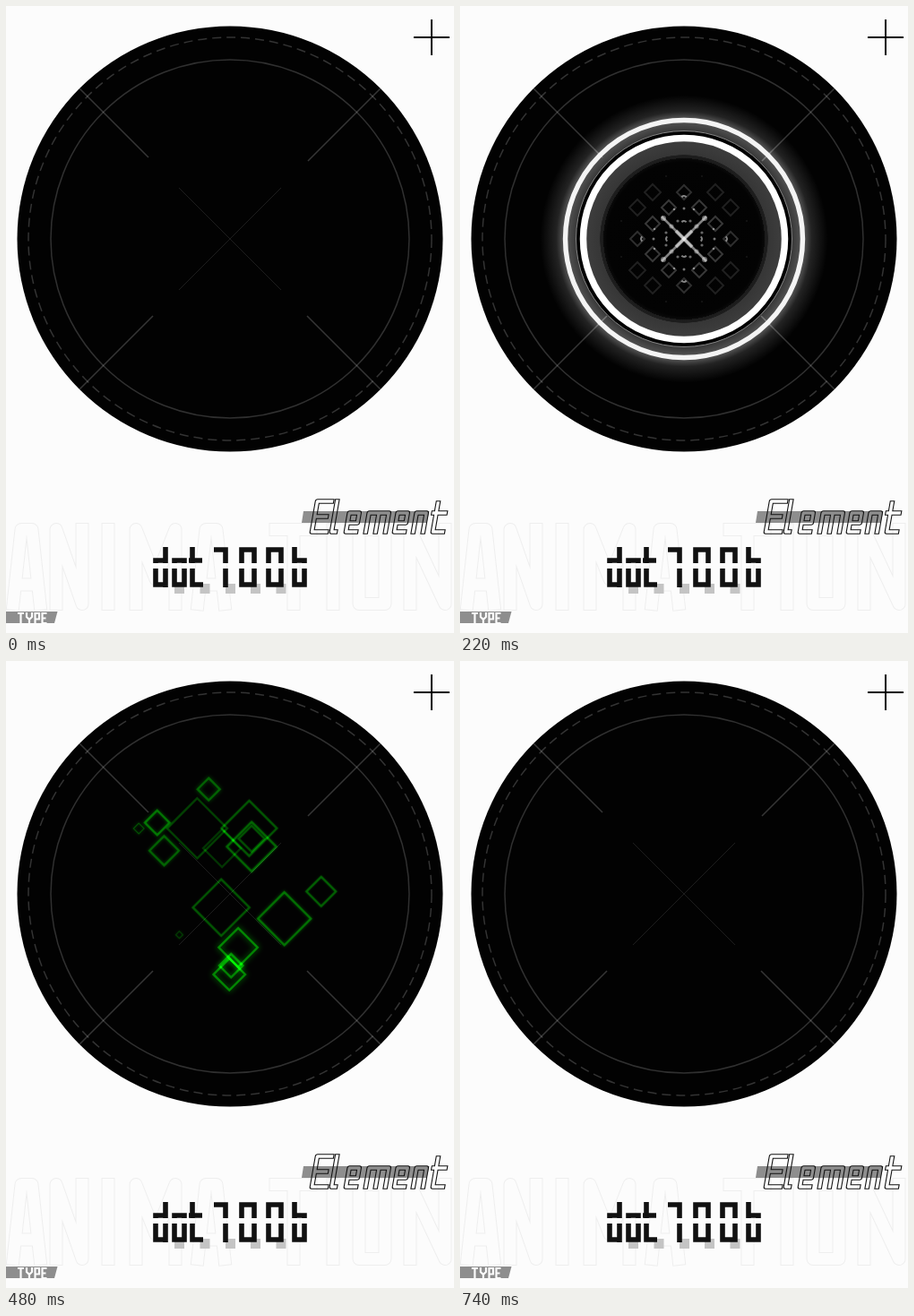
An HTML page with a canvas for the animation above (1 s loop, 500 by 700 pixels).

```html
<!DOCTYPE html>
<html lang="en">
<head>
<meta charset="utf-8">
<title>Element animation</title>
<style>
html, body { margin: 0; width: 100%; height: 100%; overflow: hidden; background: #fcfcfc; }
svg, canvas { position: absolute; left: 0; top: 0; width: 500px; height: 700px; display: block; }
path, use { fill: none; }
.line { stroke-linecap: square; stroke-linejoin: round; }
</style>
</head>
<body>
<svg viewBox="0 0 500 700" role="img" aria-label="ANIMATION, Element, dot700b, TYPE">
  <defs>
    <g id="big" class="line">
      <path d="M8 667.5L17 584.5H29L38 667.5M13 646H33"/>
      <path d="M56 667.5V584.5L85 667.5V584.5"/>
      <path d="M114 584.5V667.5"/>
      <path d="M145 667.5V584.5L167 640L189 584.5V667.5"/>
      <path d="M214 667.5L223 584.5H235L244 667.5M219 646H239"/>
      <path d="M301 584.5H340M321 584.5V667.5"/>
      <path d="M365 584.5V667.5"/>
      <path d="M394 584.5H423V667.5H394Z"/>
      <path d="M451 667.5V584.5L490 667.5V584.5"/>
    </g>
    <g id="word" class="line" transform="translate(104 0) skewX(-10)">
      <path d="M357 587H341V553H357M341 570H354"/>
      <path d="M363 553V587H367"/>
      <path d="M390 587H379V566H390V577H381"/>
      <path d="M401 587V566H423V587M412 568V587"/>
      <path d="M444 587H433V566H444V577H435"/>
      <path d="M454 587V566H465V587"/>
      <path d="M476 555V587H487M473 566H486"/>
    </g>
    <mask id="bigCut" maskUnits="userSpaceOnUse" x="0" y="0" width="500" height="700">
      <rect width="500" height="700" fill="#fff"/>
      <use href="#big" stroke="#000" stroke-width="13"/>
    </mask>
    <mask id="wordCut" maskUnits="userSpaceOnUse" x="0" y="0" width="500" height="700">
      <rect width="500" height="700" fill="#fff"/>
      <use href="#word" stroke="#000" stroke-width="3.4"/>
    </mask>
    <clipPath id="split"><path d="M150 604H350V622H150ZM150 628H350V649H150Z"/></clipPath>
  </defs>

  <path d="M475 15V55M455 35H495" stroke="#000" stroke-width="2"/>
  <g mask="url(#bigCut)"><use href="#big" stroke="#eee" stroke-width="15"/></g>

  <path d="M332 564H472.500L469.500 577H330Z" style="fill:#8e8e8e"/>
  <g mask="url(#wordCut)"><use href="#word" stroke="#111" stroke-width="5.6"/></g>

  <path d="M193.500 645v11M222 645v11M250.500 645v11M278.500 645v11M307 645v11" stroke="#c4c4c4" stroke-width="11"/>
  <g clip-path="url(#split)" stroke="#111" stroke-width="5.6">
    <path d="M178 604V649M178 619H167V646H178"/>
    <path d="M188 619H199V646H188Z"/>
    <path d="M208 604V646H220M204 619H219"/>
    <path d="M232 607H245V649"/>
    <path d="M263 607H277V646H263Z"/>
    <path d="M293 607H307V646H293Z"/>
    <path d="M322 604V646H333V619H322"/>
  </g>

  <path d="M0 676H57.500L54 689H0Z" style="fill:#8e8e8e"/>
  <path stroke="#fcfcfc" stroke-width="2.2"
    d="M13 678H20M16.500 678V690M23 677V682L26 685L29 682V677M26 685V690M32.500 690V678H37V684.500H32.500M45.500 678H40.500V689H45.500M40.500 683.500H44.500"/>
</svg>
<canvas id="stage" width="500" height="700"></canvas>

<script>
const ctx = document.getElementById('stage').getContext('2d');
const CX = 250, CY = 260, TAU = Math.PI * 2;
const clamp = (v, lo = 0, hi = 1) => Math.min(hi, Math.max(lo, v));
const grey = (v, a = 1) => `rgba(${v},${v},${v},${a})`;

// first wave: x, y at 400 ms, x, y at 540 ms, half size, brightness
const early = [
  [235, 198, 223, 123, 9.5, .65],
  [197, 222, 169, 208, 12.500, .6],
  [176, 220, 138, 175, 4.5, .6],
  [320, 163, 338, 140, 0, .6],
  [254, 303, 261, 326, 16.500, 1],
  [249, 305, 252, 353, 10, .9],
  [250, 336, 249, 355, 13.500, 1],
  [222, 291, 183, 311, 3, .4]
];
// second wave: x, y at 540 ms, half size, brightness
const late = [
  [159, 171, 10.500, .9], [209, 178, 25.500, .55], [240, 203, 16, .5],
  [274, 178, 23.500, .65], [277, 201, 21, .75], [277, 191, 11, .6],
  [268, 238, 17, .35], [266, 259, 30, .3], [272, 245, 9, .35],
  [239, 277, 24, .65], [252, 257, 24, .2], [262, 283, 7, .4],
  [318, 291, 22.500, .85], [364, 257, 12.500, .7]
];
const sparks = [
  ...early.map(([x0, y0, x, y, size, glow]) => ({ x0, y0, x, y, size, glow, start: 350 })),
  ...late.map(([x, y, size, glow]) => ({
    x0: CX + (x - CX) * .6, y0: CY + (y - CY) * .6,
    x, y, size, glow, start: 420 + (1 - glow) * 100
  }))
];

function circle(r, width, color) {
  ctx.beginPath();
  ctx.arc(0, 0, r, 0, TAU);
  ctx.lineWidth = width;
  ctx.strokeStyle = color;
  ctx.stroke();
}

function disc(r, fill, x = 0, y = 0) {
  ctx.beginPath();
  ctx.arc(x, y, r, 0, TAU);
  ctx.fillStyle = fill;
  ctx.fill();
}

function line(x0, y0, x1, y1) {
  ctx.beginPath();
  ctx.moveTo(x0, y0);
  ctx.lineTo(x1, y1);
  ctx.stroke();
}

function diamond(x, y, s) {
  ctx.beginPath();
  ctx.moveTo(x, y - s);
  ctx.lineTo(x + s, y);
  ctx.lineTo(x, y + s);
  ctx.lineTo(x - s, y);
  ctx.closePath();
  ctx.stroke();
}

function radial(outer, stops) {
  const g = ctx.createRadialGradient(0, 0, 0, 0, 0, outer);
  for (const [r, color] of stops) g.addColorStop(clamp(r / outer), color);
  return g;
}

function drawBase() {
  disc(237.5, '#020202');
  circle(200, 1.5, '#303030');
  ctx.setLineDash([10, 6]);
  circle(225, 1.5, '#333');
  ctx.setLineDash([]);
  ctx.strokeStyle = grey(255, .2);
  ctx.lineWidth = 1.6;
  line(-168, -168, -91, -91);
  line(168, -168, 87, -87);
  line(-168, 168, -86, 86);
  line(168, 168, 86, 86);
  ctx.strokeStyle = grey(255, .11);
  ctx.lineWidth = 1;
  line(-57, -57, 57, 57);
  line(57, -57, -57, 57);
}

function drawApproach(t) {
  const alpha = clamp(t / 182) * clamp((285 - t) / 45);
  if (!alpha) return;
  const r = Math.max(207.7 - .342 * t, 120);
  ctx.save();
  ctx.globalCompositeOperation = 'lighter';
  ctx.globalAlpha = alpha;
  disc(r + 28, radial(r + 28, [
    [0, grey(255, .05)], [r - 40, grey(255, .06)], [r - 20, grey(255, .13)],
    [r - 3, grey(255, .3)], [r + 3, grey(255, .3)], [r + 10, grey(255, .13)],
    [r + 28, grey(255, 0)]
  ]));
  ctx.globalCompositeOperation = 'source-over';
  circle(r, r * .041, '#f4f4f4');
  ctx.restore();
}

function drawPattern() {
  for (let k = 0; k < 4; k++) {
    ctx.save();
    ctx.rotate(k * TAU / 4);
    ctx.strokeStyle = grey(255, .5);
    ctx.lineWidth = 2.5;
    line(0, 0, 25, 25);
    ctx.lineWidth = 4;
    line(0, 0, 9, 9);
    disc(3, grey(255, .4), 23, 23);
    disc(2.6, grey(255, .35), 14, 14);
    ctx.lineWidth = 2;
    ctx.strokeStyle = grey(46);
    diamond(52, 0, 8);
    ctx.strokeStyle = grey(255, .5);
    for (const d of [17, 45]) {
      ctx.beginPath();
      ctx.arc(d, 0, 3, -1, 1);
      ctx.stroke();
    }
    disc(1.5, grey(255, .45), 34, 0);
    for (const side of [-1, 1]) {
      ctx.save();
      ctx.scale(1, side);
      ctx.strokeStyle = grey(32);
      diamond(52, 35, 9);
      ctx.strokeStyle = grey(56);
      diamond(35, 17, 8);
      disc(1.3, grey(255, .45), 33, 11);
      disc(1.6, grey(255, .4), 20, 7);
      disc(.8, grey(40), 70, 20);
      ctx.restore();
    }
    ctx.restore();
  }
}

function drawHit(t) {
  const alpha = clamp(t / 80) * clamp((430 - t) / 150);
  if (!alpha) return;
  const scale = t < 260 ? 1 : 1 + .09 * (1 - Math.exp((260 - t) / 35));
  const tint = clamp((t - 230) / 70) * clamp((390 - t) / 90);
  ctx.save();
  ctx.globalAlpha = alpha;
  ctx.scale(scale, scale);
  disc(120.5, '#020202');
  circle(120.5, 1, '#858585');
  disc(109, radial(109, [
    [0, '#020202'], [86, '#030303'], [90 - tint * 4, '#0a0a0a'],
    [90, '#1b1b1b'], [93.5, '#1e1e1e'], [94 + tint * 5, '#363636'], [109, '#3d3d3d']
  ]));
  circle(112.5, 7.5, '#fff');
  ctx.globalAlpha = alpha * alpha;
  drawPattern();
  ctx.restore();

  if (tint) {
    ctx.save();
    ctx.globalCompositeOperation = 'lighter';
    ctx.globalAlpha = tint;
    disc(190, radial(190, [
      [0, 'rgba(0,40,0,.08)'], [90, 'rgba(0,50,0,.15)'], [118, 'rgba(0,60,0,.3)'],
      [128, 'rgba(0,70,0,.7)'], [136, 'rgba(0,55,0,.35)'], [155, 'rgba(0,45,0,.15)'],
      [190, 'rgba(0,40,0,0)']
    ]));
    ctx.restore();
  }
}

function drawSparks(t) {
  const shrink = (730 - t) / 190;
  if (shrink <= 0) return;
  const travel = Math.max(-.6, 1.32 * (1 - Math.exp((400 - t) / 99)));
  ctx.save();
  ctx.globalCompositeOperation = 'lighter';
  ctx.lineWidth = 2;
  ctx.strokeStyle = 'rgb(0,115,0)';
  ctx.shadowColor = 'rgb(0,150,0)';
  for (const p of sparks) {
    if (t <= p.start) continue;
    const rise = clamp((t - p.start) / (540 - p.start));
    // a zero final size marks the one that dies first
    const size = p.size ? p.size * shrink : (480 - t) / 18;
    if (size <= 0) continue;
    ctx.globalAlpha = p.glow * Math.sqrt(rise) * clamp((740 - t) / 100);
    ctx.shadowBlur = 9 * p.glow * rise;
    ctx.lineWidth = clamp(size / 5, 1.2, 2.4);
    diamond(p.x0 - CX + (p.x - p.x0) * travel, p.y0 - CY + (p.y - p.y0) * travel, size);
  }
  ctx.restore();
}

function frame(now) {
  const t = Math.floor((now % 1000) / 20) * 20;
  ctx.setTransform(1, 0, 0, 1, 0, 0);
  ctx.clearRect(0, 0, 500, 700);
  ctx.translate(CX, CY);
  drawBase();
  drawApproach(t);
  drawHit(t);
  drawSparks(t);
  requestAnimationFrame(frame);
}

let begin;
requestAnimationFrame(function first(now) {
  begin = now;
  frame(0);
});
const tick = frame;
frame = function (now) { tick(now - begin); };
</script>
</body>
</html>
```
